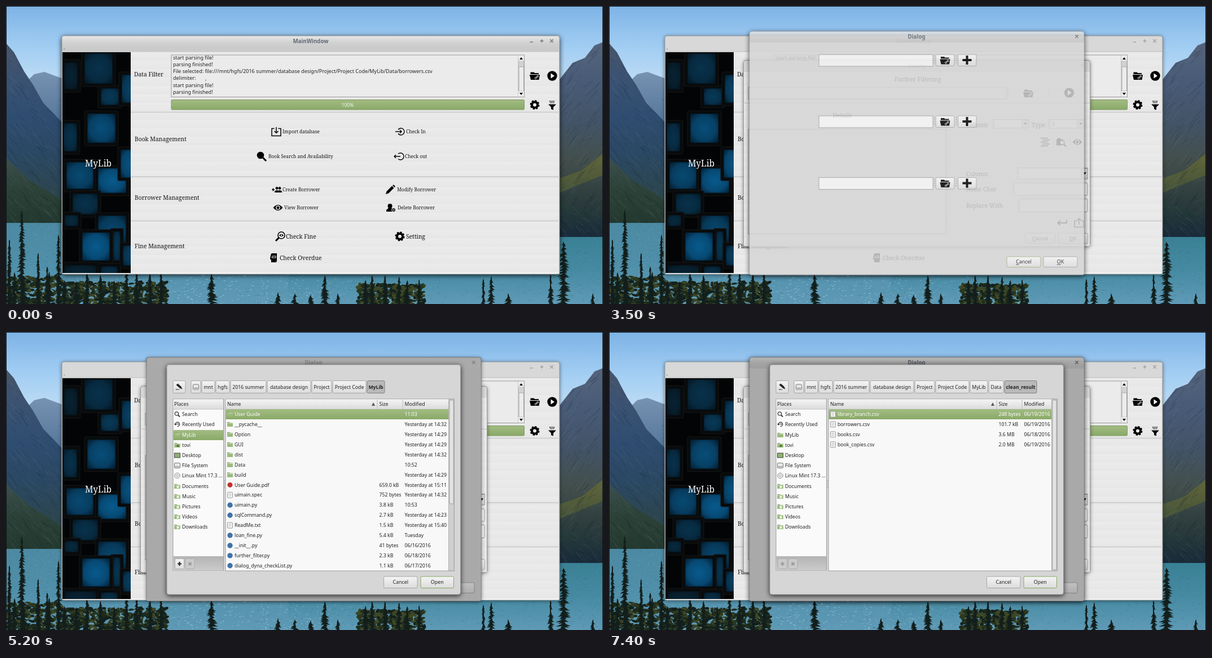
Animation of 1058x529 px, one loop 8000 ms. Source, as an HTML page with a canvas:

```html
<!DOCTYPE html>
<html lang="en">
<head>
<meta charset="utf-8">
<title>MyLib file picker</title>
<style>
html, body { margin: 0; width: 100%; height: 100%; overflow: hidden; background: #000; }
canvas, svg { position: absolute; left: 0; top: 0; width: 1058px; height: 529px; }
text { font-family: "Noto Sans", sans-serif; }
.serif { font-family: "Noto Serif", serif; }
</style>
</head>
<body>
<canvas id="wall" width="1058" height="529"></canvas>
<svg viewBox="0 0 1058 529">
  <defs>
    <linearGradient id="bar" x2="0" y2="1"><stop stop-color="#fff" stop-opacity=".4"/><stop offset="1" stop-color="#777" stop-opacity=".14"/></linearGradient>
    <linearGradient id="stripes" gradientUnits="userSpaceOnUse" x1="0" x2="0" y1="82" y2="97" spreadMethod="repeat"><stop stop-opacity="0"/><stop offset="1" stop-opacity=".02"/></linearGradient>
    <linearGradient id="btn" x2="0" y2="1"><stop stop-color="#f4f4f4"/><stop offset="1" stop-color="#dcdcdc"/></linearGradient>
    <linearGradient id="green" x2="0" y2="1"><stop stop-color="#a2bc83"/><stop offset="1" stop-color="#8aa968"/></linearGradient>
    <linearGradient id="tools" x2="0" y2="1"><stop stop-color="#b4b4b4"/><stop offset="1" stop-color="#cacaca"/></linearGradient>
    <radialGradient id="glow" r=".75"><stop stop-color="#085a8c"/><stop offset=".55" stop-color="#074a75"/><stop offset="1" stop-color="#021524"/></radialGradient>
    <clipPath id="side"><path d="M100 82h121v392h-121z"/></clipPath>
    <clipPath id="partial"><path d="M290 115h96v101h-96z"/></clipPath>
  </defs>
  <g id="scene"></g>
</svg>
<script>
// Wallpaper
const ctx = document.getElementById('wall').getContext('2d');
let seed = 7;
const rnd = () => (seed = seed * 16807 % 2147483647) / 2147483647;

function shade(y0, y1, ...colors) {
  const g = ctx.createLinearGradient(0, y0, 0, y1);
  colors.forEach((c, i) => g.addColorStop(i / (colors.length - 1), c));
  return g;
}
function slope(points, fill, grain, dir) {
  const xs = points.map(p => p[0]), ys = points.map(p => p[1]);
  const x0 = Math.min(...xs), x1 = Math.max(...xs), y0 = Math.min(...ys), y1 = Math.max(...ys);
  ctx.save();
  ctx.beginPath();
  points.forEach(p => ctx.lineTo(...p));
  ctx.fillStyle = fill;
  ctx.fill();
  ctx.clip();
  for (let i = 0; i < grain; i++) {
    const x = x0 + rnd() * (x1 - x0), y = y0 + rnd() * (y1 - y0), l = 4 + rnd() * 14;
    ctx.strokeStyle = rnd() < .55 ? 'rgba(10,22,38,.22)' : 'rgba(170,175,180,.12)';
    ctx.beginPath();
    ctx.moveTo(x, y);
    ctx.lineTo(x + dir * l, y + l * (.6 + rnd()));
    ctx.stroke();
  }
  ctx.restore();
}
function tree(x, top, base, width, color) {
  ctx.fillStyle = color;
  ctx.fillRect(x - 1, top, 2, base - top);
  for (let y = top; y < base; y += 2.5) {
    const half = 1 + width * Math.sqrt((y - top) / (base - top)) * .75;
    const l = half * (.2 + rnd() * .8), r = half * (.2 + rnd() * .8);
    ctx.beginPath();
    ctx.moveTo(x, y - 3);
    ctx.lineTo(x + r, y + 2);
    ctx.lineTo(x, y + 2);
    ctx.lineTo(x - l, y + 3);
    ctx.fill();
  }
}
function thicket(x0, x1, top) {
  for (let i = 0; i < (x1 - x0) * 3; i++) {
    const x = x0 + rnd() * (x1 - x0), y = top + 6 + rnd() * (529 - top);
    ctx.fillStyle = ['#14201b', '#1d2a1c', '#2c381f', '#3d4726'][rnd() * 4 | 0];
    ctx.beginPath();
    ctx.ellipse(x, y, 2 + rnd() * 4, 1 + rnd() * 2.5, rnd() - .5, 0, 7);
    ctx.fill();
  }
}
function wallpaper() {
  ctx.fillStyle = shade(0, 150, '#7db3e6', '#a3cef3', '#c4e0f5');
  ctx.fillRect(0, 0, 1058, 529);
  slope([[30, 140], [50, 121], [68, 117], [98, 128], [200, 190], [200, 260], [30, 260]], shade(115, 220, '#7893b2', '#4f7196'), 70, 1);
  slope([[0, 66], [14, 82], [32, 116], [48, 140], [66, 172], [98, 205], [150, 250], [150, 400], [0, 400]],
    shade(66, 390, '#47556a', '#3a5272', '#2f4d70', '#2b4864', '#2c4651', '#2a4240'), 320, 1);
  slope([[0, 270], [40, 308], [100, 345], [100, 388], [0, 388]], shade(262, 388, '#3f5150', '#2d4339', '#22382f'), 120, 1);
  slope([[1058, 64], [1043, 70], [1026, 92], [1004, 101], [975, 138], [900, 220], [900, 415], [1058, 415]],
    shade(64, 415, '#55647c', '#485b77', '#435468', '#434f4c', '#2c3c3c', '#1c2d3a'), 340, -1);
  slope([[1058, 262], [1020, 292], [975, 308], [975, 334], [1058, 300]], shade(262, 330, '#616539', '#46543a'), 80, -1);
  slope([[970, 345], [1058, 372], [1058, 414], [970, 410]], shade(345, 414, '#293f3a', '#18293a'), 50, 1);

  ctx.fillStyle = shade(385, 529, '#4c89a2', '#508fa9', '#5f9ab6');
  ctx.fillRect(0, 385, 500, 144);
  ctx.fillStyle = shade(410, 529, '#3a8094', '#468aa2', '#5f9ab6');
  ctx.fillRect(500, 410, 558, 119);
  for (let i = 0; i < 3200; i++) {
    const x = rnd() * 1058, near = Math.max(.12, 1 - Math.abs(x - 380) / 400);
    ctx.fillStyle = rnd() < .3 ? 'rgba(30,80,110,.25)' : `rgba(205,228,242,${(near * .5).toFixed(2)})`;
    ctx.fillRect(x, (x < 500 ? 388 : 414) + rnd() * 140, 1 + rnd() * 3, 1);
  }
  const dark = '#131f1c';
  thicket(0, 100, 474);
  thicket(100, 285, 484);
  thicket(624, 742, 488);
  for (let x = 6; x < 285; x += 22) tree(x + rnd() * 12, 468 + rnd() * 26, 535, 12, dark);
  for (let x = 628; x < 742; x += 20) tree(x + rnd() * 10, 472 + rnd() * 18, 535, 12, dark);
  [[28, 364, 14], [6, 416, 10], [57, 440, 9], [73, 464, 9], [93, 408, 12], [364, 476, 18], [482, 510, 12], [512, 512, 14],
    [565, 480, 16], [588, 512, 12], [540, 514, 12], [846, 486, 7], [860, 482, 12], [890, 512, 14], [965, 478, 10], [988, 420, 24], [1040, 512, 12]]
    .forEach(([x, top, w]) => tree(x, top, 535, w, dark));
  ctx.fillStyle = '#0b1113';
  ctx.fillRect(0, 0, 1058, 1);
  ctx.fillRect(0, 0, 1, 529);
  ctx.fillRect(1057, 0, 1, 529);
}

// Drawing helpers, each returns SVG markup
const rect = (x, y, x2, y2, fill, stroke = 'none', r = 0, extra = '') =>
  `<rect x="${x}" y="${y}" width="${x2 - x}" height="${y2 - y}" fill="${fill}" stroke="${stroke}" rx="${r}" ${extra}/>`;
const text = (x, y, s, size = 8.7, fill = '#222', extra = '') =>
  `<text x="${x}" y="${y + size * .36}" font-size="${size}" fill="${fill}" ${extra}>${s}</text>`;
const mid = (x, y, s, size, fill, extra = '') => text(x, y, s, size, fill, 'text-anchor="middle" ' + extra);
const serif = (x, y, s, size = 10.3) => text(x, y, s, size, '#151515', 'class="serif"');
const path = (d, stroke = '#000', w = 1, fill = 'none', extra = '') => `<path d="${d}" stroke="${stroke}" stroke-width="${w}" fill="${fill}" ${extra}/>`;
const dashed = (d, stroke, w) => path(d, stroke, w, 'none', 'stroke-dasharray="1.5 1"');
const solid = (d, fill = '#000') => path(d, 'none', 0, fill);
const dot = (x, y, r, fill = '#000', stroke = 'none', w = 1) => `<circle cx="${x}" cy="${y}" r="${r}" fill="${fill}" stroke="${stroke}" stroke-width="${w}"/>`;
const at = (x, y, s, extra = '') => `<g transform="translate(${x} ${y}) ${extra}">${s}</g>`;
const grip = d => `<path d="${d}" stroke="#888" stroke-dasharray="1.5 2.5"/>`;
const vgrip = (x, y, h = 16) => grip(`M${x} ${y - h / 2}v${h}`);
const hgrip = (x, y) => grip(`M${x} ${y}h18`);
const under = s => `<tspan text-decoration="underline">${s[0]}</tspan>${s.slice(1)}`;
const button = (x, y, x2, y2, label = '', border = '#a6a6a6') =>
  rect(x, y, x2, y2, 'url(#btn)', border, 2) + mid((x + x2) / 2, (y + y2) / 2, label, 8.9, '#222');
const down = (x, y) => solid(`M${x - 3} ${y - 2}h6l-3 4z`);
const combo = (x, y, x2, y2) => rect(x, y, x2, y2, '#f3f3f3', '#999') + rect(x2 - 11, y + 1, x2, y2 - 1, '#ddd', '#aaa') + down(x2 - 5, (y + y2) / 2);
const lens = (r, fill) => dot(-2, -2, r, fill, '#000', 1.6) + path(`M${r * .6 - 1} ${r * .6 - 1}L8 8`, '#000', 3);
const person = x => dot(x, -2.5, 2.4) + solid(`M${x - 4} 5v-2q4-4 8 0v2z`);

const icon = {
  folder: solid('M-7.500-3v-3.500h6l1.500 1.500h7v2z') + solid('M-9-2h18l-1.500 9h-14.500z') +
    path('M2 3.500l3-2.500', '#fff', 1) + dot(1.5, 4, 1.5, 'none', '#fff', .8) + dot(5.2, .8, 1.5, 'none', '#fff', .8),
  play: dot(0, 0, 8.7) + solid('M-2.500-4.500l6.500 4.500l-6.500 4.500z', '#fff'),
  gear: dot(0, 0, 5, 'none', '#000', 4) + `<circle r="7" fill="none" stroke="#000" stroke-width="3" stroke-dasharray="3.2 2.3"/>`,
  funnel: dashed('M-5-7h10M-4-4.500h8', '#000', 1.3) + solid('M-7-1.500h14l-5 5v5l-4-1.500v-3.500z'),
  inbox: path('M-3.500-5.500h-4.500v13h16v-13h-4.500M0-8v10M-3.500-1l3.500 3.500l3.500-3.500', '#000', 1.5),
  enterCircle: path('M-4-3.500a6 6 0 1 1 0 7M-9 0h11M-1-3l3 3l-3 3', '#000', 1.4),
  leaveCircle: path('M-2-4.500a6 6 0 1 1 0 9M-9 0h11M-6-3l-3 3l3 3', '#000', 1.4),
  search: lens(5.5, '#000'),
  group: path('M-9 0h5M-6.500-2.500v5', '#000', 1.5) + person(0) + person(5),
  pencil: solid('M-8 8l1.500-5l9.500-9.500l3.500 3.500l-9.500 9.500zM4-7.500l1.500-1q3 .5 3 3.500l-1 1z'),
  eye: solid('M-8.500 0q8.500-10 17 0q-8.500 10-17 0z') + dot(0, 0, 3.2, '#000', '#fff', 1.3),
  remove: dot(-1.5, -3, 4) + solid('M-8 7v-3q3-2 4-4h5q1 2 2 2v5z') + dot(5, 4, 3.4, '#000', '#eee') + path('M3.700 2.700l2.600 2.600m0-2.600l-2.600 2.600', '#fff', .8),
  inspect: at(1, 0, lens(6, '#eee'), 'scale(-1 1)') + solid('M-1-2q4-4.500 8 0q-4 4.500-8 0z') + dot(3, -2, 1.3, '#fff'),
  head: solid('M-4 8v-4l-2-2q1-9 3-10h9v13l-1 3z') + path('M-3 0h7v-3h-6z', '#eee', 1),
  list: path('M-8-7h13M-5-3.500h13M-8 0h13M-5 3.500h13M-8 7h13', '#000', 1.5),
  browse: solid('M-8 6v-11h2v-2h5v2h4v11z') + dot(2, 1, 4, '#ddd', '#000', 1.5) + path('M5 4l4 4', '#000', 2.4),
  back: path('M8-5v5h-15M-3.500-4l-4 4l4 4', '#000', 2),
  outbox: path('M-3.500-3.500h-4.500v11h16v-11h-4.500M0 3v-11M-3.500-4.500l3.500-3.500l3.500 3.500', '#000', 1.5),
  plus: path('M-8 0h16M0-8v16', '#000', 4)
};
const put = (name, x, y) => at(x, y, icon[name]);

function panel(x, y, x2, y2, fill, lifted) {
  const shadow = lifted ? '0 2px 4px rgba(0,0,0,.75)' : '0 1px 3px rgba(0,0,0,.45)';
  return rect(x, y, x2, y2, fill, '#989898', 4, `style="filter:drop-shadow(${shadow})"`);
}
function frame(x, y, x2, y2, title, focused, barHeight, rightInset) {
  const ink = focused ? '#626a73' : '#a4a4a4';
  return panel(x, y, x2, y2, '#d8d8d8', focused) +
    (focused ? rect(x + .5, y + .5, x2 - .5, y + barHeight, 'url(#bar)', 'none', 3) : '') +
    mid(title === 'Dialog' ? 545 : 540, y + 10, title, 9.7, ink, 'font-weight="bold"') +
    at(x2 - rightInset, y + 9, path('M-2.700-2.700l5.400 5.400m0-5.400l-5.400 5.400', focused ? '#7c7c7c' : ink, 1.6));
}

// [x, y, width, height, brightness]
const tiles = [[103, 100, 24, 48, .3], [168, 146, 32, 30, .6], [139, 84, 50, 54, .5], [205, 122, 30, 50, .7], [102, 208, 24, 50, .5],
  [144, 191, 50, 52, .85], [107, 277, 48, 48, .8], [163, 288, 50, 44, 1], [203, 255, 30, 50, .9], [118, 333, 45, 37, .5],
  [163, 372, 50, 50, .75], [104, 371, 24, 20, .4], [190, 400, 13, 52, .55], [207, 425, 26, 36, .65], [135, 402, 49, 50, 1], [104, 460, 56, 20, .3], [168, 462, 30, 20, .45]];
const sidebar = rect(100, 82, 221, 474, '#020405') + `<g clip-path="url(#side)">` +
  tiles.map(([x, y, w, h, b]) => rect(x - 5, y - 5, x + w + 5, y + h + 5, '#080a0b', '#171614', 2) +
    rect(x, y, x + w, y + h, 'url(#glow)', '#03151f', 2, `opacity="${b}"`)).join('') + '</g>' +
  mid(163.5, 279, 'MyLib', 15.4, '#fff', 'class="serif"');

const logLines = ['start parsing file!', 'parsing finished!',
  'File selected: file:///mnt/hgfs/2016 summer/database design/Project/Project Code/MyLib/Data/borrowers.csv',
  'delimiter:', 'start parsing file!', 'parsing finished!'];
const actions = [['inbox', 479, 223, 'Import database', 490], ['enterCircle', 699, 223, 'Check In', 709], ['search', 453, 267, 'Book Search and Availability', 465],
  ['leaveCircle', 697, 267, 'Check out', 707], ['group', 480, 326, 'Create Borrower', 490], ['pencil', 681, 326, 'Modify Borrower', 693],
  ['eye', 482, 358, 'View Borrower', 493], ['remove', 682, 358, 'Delete Borrower', 694], ['inspect', 485, 409, 'Check Fine', 496],
  ['gear', 698, 409, 'Setting', 709], ['head', 474, 447, 'Check Overdue', 485]];

function mainWindow(focused) {
  const ink = focused ? '#777' : '#a4a4a4';
  return frame(99, 53, 981, 476, 'MainWindow', focused, 27, 14) +
    path('M928.500 64h5.500M946.500 62h6M949.500 59v6', ink, 1.5) + text(102, 74, '.', 9) +
    rect(100, 81, 980, 475, '#ebebeb') + rect(221, 82, 980, 474, 'url(#stripes)') +
    path('M99 81h882', '#bbb') + path('M100 474.500h881', '#f8f8f8', 1.5) +
    [188.5, 303, 381.5].map(y => path(`M221 ${y}h760`, '#cfcfcf', 2)).join('') + sidebar +
    serif(227, 121, 'Data Filter') + serif(228, 236, 'Book Management') + serif(228, 340, 'Borrower Management') + serif(228, 426, 'Fine Management') +
    rect(293, 87, 918.5, 161.5, '#ebebeb', '#999') + logLines.map((s, i) => text(296, 91.5 + i * 12.25, s, 9)).join('') + text(353, 128.3, ',', 9) +
    rect(908, 87.5, 918, 161, '#d2d2d2', '#aaa') + rect(909, 108, 917.5, 151, '#ececec', '#aaa') +
    rect(908, 87.5, 918, 97, '#ececec') + rect(908, 151, 918, 161, '#ececec') + solid('M910 95h6l-3-4z') + down(913, 156) +
    rect(293, 166.5, 918.5, 184, 'url(#green)', '#7f9962', 1.5) + mid(605.5, 175.5, '100%', 8.7, '#f3f6ef') +
    put('folder', 937, 124) + put('play', 968, 124) + put('gear', 937, 175.5) + put('funnel', 968, 176) +
    actions.map(([name, x, y, label, tx]) => put(name, x, y) + serif(tx, y, label, y < 400 ? 8.4 : 10.3)).join('');
}

function filterDialog(focused, pressed) {
  return frame(238.5, 96.500, 852.5, 427, 'Dialog', focused, 20, 13.5) + rect(239, 117, 852, 426, '#ebebeb') + rect(239, 117, 852, 426, 'url(#stripes)') +
    serif(506, 130, 'Further Filtering') + rect(247, 144, 705, 165, '#e9e9e9', '#999') +
    vgrip(707.5, 154) + put('folder', 743, 155) + vgrip(780, 154) + put('play', 815.5, 154) + path('M240 172.500h612', '#cfcfcf', 1.5) +
    serif(396.5, 194, 'Details') + rect(247, 219, 598, 404.5, 'none', '#939393') +
    serif(633, 211, 'Column') + vgrip(679.5, 210) + combo(682, 201.5, 743, 217) + vgrip(746, 210) + serif(749, 211, 'Type') + vgrip(779, 210) + combo(781, 201.5, 841, 217) +
    text(786, 210, '\\', 9) + hgrip(729, 221) + put('list', 773, 241.5) + vgrip(789.5, 241) + put('browse', 801, 241.5) + vgrip(817, 241) + put('eye', 830, 241.5) +
    serif(633, 298, 'Column') + vgrip(723, 298) + combo(725, 287.5, 848, 307) + hgrip(732, 310.5) +
    serif(633, 325, 'Noise Char') + vgrip(715.5, 325) + rect(718, 314, 848, 336, '#f3f3f3', '#999', 2) + hgrip(732, 339) +
    serif(633, 354.5, 'Replace With') + vgrip(725, 354) + rect(727, 342.5, 848, 365.5, '#f3f3f3', '#999', 2) +
    put('back', 803, 385) + vgrip(818.5, 385) + (pressed ? rect(821, 374, 845, 397, '#f0f0f0', '#aaa', 1) : '') + put('outbox', 833, 385) +
    button(738, 403.5, 790.5, 422, under('Cancel')) + button(796, 403.5, 848.5, 422, under('OK'));
}

function importDialog(focused, hover, dim) {
  const row = y => rect(372, y, 574, y + 21, '#f3f3f3', '#a0a0a0') + vgrip(576.5, y + 10) + button(579, y, 612, y + 20.500) +
    (hover && y < 100 ? rect(580, y + 1, 611, y + 19.5, '#f8f8f8', 'none', 2) : '') + put('folder', 595.5, y + 10.5) +
    vgrip(615.5, y + 10) + button(618.5, y, 651, y + 20.500) + put('plus', 634.5, y + 10);
  return frame(249, 45, 842, 477.500, 'Dialog', focused, 20, 13) + rect(249.5, 65, 841.5, 477, '#d6d6d6') + [86, 195, 304.5].map(row).join('') +
    button(705, 445, 765, 463.5, under('Cancel'), '#a3b489') + button(770, 445, 830, 463.5, under('OK')) +
    (dim ? rect(248.5, 44.5, 842.5, 478, '#000', 'none', 4, `opacity="${dim}"`) : '');
}

const folderIcon = solid('M-5-4h4l1 1h5v7h-10z', '#7da05c') + solid('M-5-1.500h10v5.500h-10z', '#9aba7b') + path('M-4.500-2h9.500', '#e6efdc');
const drive = rect(-5, -4.5, 5, 4.5, '#e8e8e8', '#777', 1.5) + path('M-4 2h8', '#777');
const fileIcons = {
  dir: folderIcon,
  pdf: dot(0, 0, 4.5, '#c4302b'),
  py: dot(0, 0, 4.7, '#3f74a8'),
  txt: rect(-4.5, -5, 4.5, 5, '#f4f4f4', '#999', 1) + path('M-2.500-2h5M-2.500 0h5M-2.500 2h4', '#bbb', .8)
};
const places = [['Search', 146], ['Recently Used', 164], ['MyLib', 183], ['tovi', 201], ['Desktop', 219], ['File System', 237],
  ['Linux Mint 17.3 ...', 255], ['Documents', 274], ['Music', 292], ['Pictures', 310], ['Videos', 328], ['Downloads', 346]];
const placeIcon = i => i === 0 ? dot(-1, -1, 3.2, 'none', '#333', 1.3) + path('M1.500 1.500l3 3', '#333', 1.8)
  : i === 1 ? path('M-3 1a3.700 3.700 0 1 1 3 2.500M-5-1l2 2l2-2M1-2v2h2', '#333', 1.2)
  : i === 4 ? rect(-5, -4, 5, 4, '#8fb06e', '#444') : i === 5 ? drive
  : i === 6 ? dot(0, 0, 4.8, '#e6e6e6', '#999') + dot(0, 0, 1.5, '#fff', '#aaa')
  : folderIcon + (i > 2 ? rect(-1, -1, 3, 3, i > 6 ? '#eef3e8' : '#567a3a') : '');

const parse = s => s.trim().split('\n').map(line => line.trim().split('|'));
const folders = [
  { cols: [658, 703], thumb: 305, crumbs: [['MyLib', 640, 671]], files: parse(`dir|User Guide||11:03
    dir|__pycache__||Yesterday at 14:32
    dir|Option||Yesterday at 14:29
    dir|GUI||Yesterday at 14:29
    dir|dist||Yesterday at 14:32
    dir|Data||10:52
    dir|build||Yesterday at 14:29
    pdf|User Guide.pdf|659.0 kB|Yesterday at 15:11
    txt|uimain.spec|752 bytes|Yesterday at 14:32
    py|uimain.py|3.8 kB|10:53
    py|sqlCommand.py|2.7 kB|Yesterday at 14:23
    txt|ReadMe.txt|1.5 kB|Yesterday at 15:40
    py|loan_fine.py|5.4 kB|Tuesday
    py|__init__.py|41 bytes|06/16/2016
    py|further_filter.py|2.3 kB|06/18/2016
    py|dialog_dyna_checkList.py|1.1 kB|06/17/2016`) },
  { cols: [687, 732], thumb: 422, crumbs: [['MyLib', 640, 671], ['Data', 673, 699]], files: parse(`dir|raw_data||06/19/2016
    dir|clean_result||06/19/2016
    txt|library_branch.csv|248 bytes|06/19/2016
    txt|borrowers.csv|101.7 kB|06/19/2016
    txt|books.csv|3.6 MB|06/18/2016`) },
  { cols: [687, 732], thumb: 422, crumbs: [['MyLib', 640, 671], ['Data', 673, 699], ['clean_result', 701, 758]], files: parse(`txt|library_branch.csv|248 bytes|06/19/2016
    txt|borrowers.csv|101.7 kB|06/19/2016
    txt|books.csv|3.6 MB|06/18/2016
    txt|book_copies.csv|2.0 MB|06/19/2016`) }
];
const baseCrumbs = [['', 328, 345], ['mnt', 347, 370], ['hgfs', 372, 396], ['2016 summer', 398, 461], ['database design', 463, 540],
  ['Project', 542, 577], ['Project Code', 579, 638]];

function crumb([label, x, x2], active) {
  return rect(x, 86.5, x2, 108.5, active ? '#b9b9b9' : 'url(#btn)', active ? '#808080' : '#a6a6a6', 2) +
    mid((x + x2) / 2, 97.5, label, 8.7, '#222', active ? 'font-weight="bold"' : '');
}
function placesPane(folder) {
  const mark = (x, d, on) => rect(x - 8, 402.5, x + 8, 420.5, on ? 'url(#btn)' : '#cbcbcb', '#adadad', 2) + at(x, 411.5, path(d, on ? '#222' : '#999', 2.2));
  return rect(296, 119, 385.5, 423, '#fafafa', '#9c9c9c') + rect(296.5, 119.5, 385, 136.5, 'url(#btn)') + path('M296 137h89', '#bbb') + text(298, 128, 'Places') +
    (folder === 0 ? rect(296.5, 174, 385, 192, 'url(#green)') : '') +
    places.map(([label, y], i) => at(303.5, y, placeIcon(i)) + text(312, y, label, 8.7, i === 2 && folder === 0 ? '#fff' : '#222')).join('') +
    rect(296.5, 398, 385, 422.5, 'url(#tools)') + mark(307.5, 'M-3.500 0h7M0-3.500v7', folder < 2) + mark(326, 'M-2.500-2.500l5 5m0-5l-5 5', false);
}
function fileList(folder, selected) {
  const { cols: [size, date], thumb, files } = folders[folder];
  const row = ([kind, name, bytes, when], i) => {
    const y = 146 + i * 17.92, on = i === selected, ink = on ? '#fff' : '#222';
    return (on ? rect(389.5, y - 9, 784, y + 9, 'url(#green)') : '') + at(397, y, fileIcons[kind]) +
      text(405, y, name, 8.7, ink) + text(size + 3.5, y, bytes, 8.7, ink) + text(date + 3.5, y, when, 8.7, ink);
  };
  return rect(389, 119, 794.5, 424, '#f8f8f8', '#9c9c9c') + rect(389.5, 119.5, 784, 136.5, 'url(#btn)') +
    path(`M389 137h395M${size} 120v17M${date} 120v17`, '#bbb') + text(392, 128, 'Name') + text(size + 3.5, 128, 'Size') + text(date + 3.5, 128, 'Modified') +
    solid(`M${size - 10} 131h6l-3-6z`, '#555') + files.map(row).join('') +
    rect(784.5, 119.5, 794, 423.5, '#cfcfcf', '#b0b0b0') + rect(786, 121, 793, thumb, '#e4e4e4', '#a2a2a2', 2);
}
function fileDialog({ stage, folder, selected }) {
  const crumbs = baseCrumbs.concat(folders[folder].crumbs);
  let s = panel(285, 58, 805.5, 466, '#d6d6d6', stage === 2);
  if (stage) s += crumb(['', 296, 318], false) + at(307, 97, solid('M-5.500-3l3-2.500l6 5.500l2 4.500l-4-1.500z', '#222') + dashed('M-6 5h6', '#222', 1.3));
  if (stage === 1) s += `<g clip-path="url(#partial)">${placesPane(0)}</g>` + rect(389, 119, 430.5, 216, '#f8f8f8') + path('M389 216v-97h41.500', '#9c9c9c');
  if (stage === 2) s += crumbs.map((c, i) => crumb(c, i === crumbs.length - 1)).join('') + at(336.5, 97.5, drive) +
    placesPane(folder) + vgrip(387.5, 271) + fileList(folder, selected) +
    button(669.5, 434, 729, 454.5, 'Cancel') + button(735, 434, 793.5, 454.5, 'Open', '#86a860');
  return s;
}

// Each step changes a few values and keeps the rest
const start = { filter: 0, filterFocus: true, pressed: false, importer: 0, importFocus: true, hover: false, dim: 0, files: 0, stage: 0, folder: 0, selected: 0 };
const changes = [
  [0, {}], [1400, { filter: .6 }], [1500, { filter: .9 }], [1600, { filter: 1 }],
  [2500, { pressed: true }], [2600, { filterFocus: false }], [2700, { pressed: false }],
  [3500, { importer: .85 }], [3600, { importer: 1 }], [4500, { hover: true }],
  [4700, { importFocus: false, hover: false }], [4800, { files: .8 }], [4900, { files: 1, stage: 1 }],
  [5000, { stage: 2, dim: .07 }], [5100, { dim: .15 }], [5200, { dim: .21 }],
  [6300, { selected: 5, importFocus: true }], [6400, { folder: 1, selected: 0 }],
  [7200, { selected: 1 }], [7400, { folder: 2, selected: 0 }]
];
let state = start;
const steps = changes.map(([time, change]) => [time, state = { ...state, ...change }]);

const layer = (opacity, draw) => opacity ? `<g opacity="${opacity}">${draw()}</g>` : '';
const scene = document.getElementById('scene');
let shown;
function tick() {
  const time = performance.now() % 8000;
  const s = steps.findLast(([from]) => from <= time)[1];
  if (s !== shown) {
    shown = s;
    scene.innerHTML = mainWindow(!s.filter) + layer(s.filter, () => filterDialog(s.filterFocus, s.pressed)) +
      layer(s.importer, () => importDialog(s.importFocus, s.hover, s.dim)) + layer(s.files, () => fileDialog(s));
  }
  requestAnimationFrame(tick);
}
wallpaper();
tick();
</script>
</body>
</html>
```
